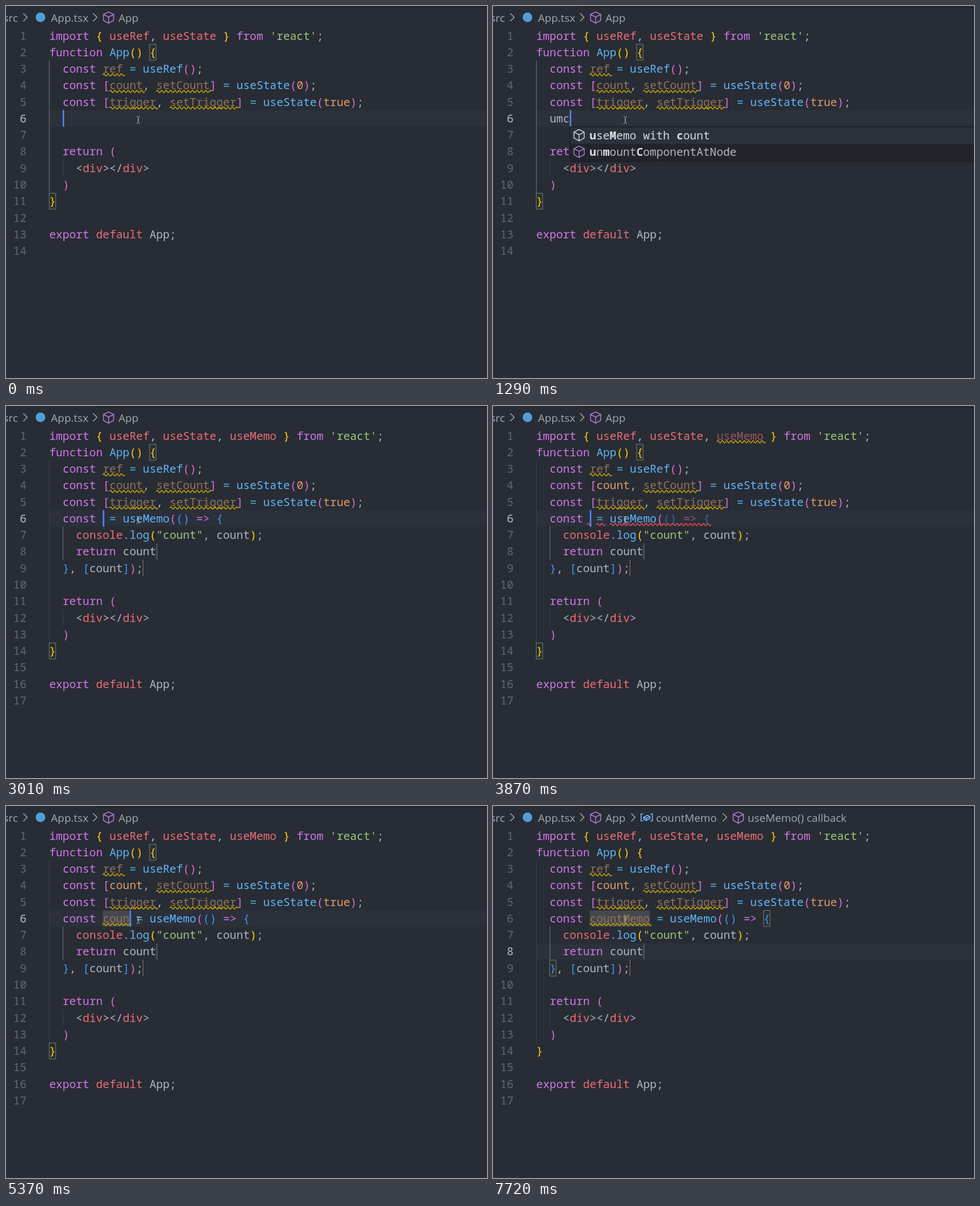
An HTML page that plays this animation: 851 by 658 pixels, repeating every 8 s.

```html
<!DOCTYPE html>
<html lang="en">
<head>
<meta charset="utf-8">
<title>Snippet completion</title>
<style>
  html, body { margin: 0; width: 100%; height: 100%; overflow: hidden; background: #282c34; }
  svg { display: block; width: 851px; height: 658px; }
  text { font: 19.71px "Noto Sans Mono", monospace; white-space: pre; font-variant-ligatures: none; }
  .crumb { font: 19px "Open Sans", sans-serif; fill: #a3a9b5; }
  .hint { font-size: 16.8px; fill: #7b818c; }
  .hit { font-weight: 700; fill: #dde0e6; }
  path { fill: none; }
</style>
</head>
<body>
<svg id="stage" viewBox="0 0 851 658"></svg>
<script>
const LOOP = 8000, CHAR = 11.83, ROW = 29.28, LEFT = 76.5, TOP = 37.9;
const stage = document.getElementById('stage');

const colors = {
  k: '#d278e8', r: '#ec6d77', w: '#b0b7c4', g: '#9bc77c', b: '#61b5f8', o: '#e09c6a',
  c: '#50b4dc', y: '#ffd10a', p: '#da70d6', n: '#3d97f5', d: '#93745a', e: '#9c575f',
  m: '#3567a0', q: '#98567f'
};
const YELLOW = '#cca700', RED = '#f14c4c', VIOLET = '#b180d7', SKY = '#75beff', PALE = '#d7dae0';
const FAINT = '#3b4048', STRONG = '#636b78';

// "~x" switches the ink to colors.x
const tail = ['~kreturn ~p(', '  ~w<~rdiv~w></~rdiv~w>', '~p)'].map(s => '  ' + s)
  .concat('~y}', '', '~kexport ~rdefault ~wApp;', '');
const head = (extra, count) => [
  `~kimport ~y{ ~ruseRef~w, ~ruseState${extra} ~y} ~kfrom ~g'react'~w;`,
  '~kfunction ~bApp~y() {',
  '  ~kconst ~dref ~c= ~buseRef~p()~w;',
  `  ~kconst ~p[~${count}count~w, ~dsetCount~p] ~c= ~buseState~p(~o0~p)~w;`,
  '  ~kconst ~p[~dtrigger~w, ~dsetTrigger~p] ~c= ~buseState~p(~otrue~p)~w;'
];

// Suggestions: icon letter, then the label with *matched* letters
const lists = {
  u: ['C*u*seState', 'C*u*seRef', 'C*u*seMemo', 'C*u*seEffect', 'C*u*seContext', 'C*u*seReducer',
      'C*u*seCallback', 'V*u*seHistory', 'V*u*seLocation', 'V*u*seParams', 'V*u*seRouteMatch', 'C*u*nescape'],
  um: ['C*u*se*M*emo', 'C*u*n*m*ountComponentAtNode', 'V*u*seRoute*M*atch|react', 'C*u*seI*m*perativeHandle',
       'V*u*sePara*m*s|react', 'V*U*int8Cla*m*pedArray', 'V*U*RLSearchPara*m*s',
       'Cdecode*U*RICo*m*ponent', 'Cencode*U*RICo*m*ponent'],
  umc: ['C*u*se*M*emo with *c*ount', 'C*u*n*m*ount*C*omponentAtNode'],
  umco: ['C*u*se*M*emo with *co*unt'],
  umcou: ['C*u*se*M*emo with *cou*nt'],
  c: ['W*c*aption', 'W*c*ircle', 'W*c*ite', 'W*c*lass', 'W*c*ode', 'W*c*ol', 'W*c*olg',
      'W*c*olgroup', 'W*c*ommand', 'W*c*onst', 'S*c*tor', 'W*c*ursor'],
  co: ['W*co*de', 'W*co*l', 'W*co*lg', 'W*co*lgroup', 'W*co*mmand', 'S*c*t*o*r']
};

// time, typed word, caret shown, options
const steps = [
  [0, '', 1], [200, '', 0], [410, 'u', 1], [630, 'um', 1], [1070, 'um', 0],
  [1290, 'umc', 1], [1510, 'umco', 1], [1720, 'umcou', 1],
  [2150, 'umcou', 0, { wrong: 1 }], [2800, 'umcou', 1, { wrong: 1 }],
  [3010, '', 1, { open: 1, fresh: 1 }], [3440, '', 0, { open: 1, broken: 1 }],
  [3870, '', 1, { open: 1, broken: 1 }], [4510, 'c', 1, { open: 1, broken: 1 }],
  [4940, 'co', 1, { open: 1, broken: 1 }], [5150, 'cou', 1, { open: 1, broken: 1 }],
  [5370, 'coun', 1, { open: 1 }], [5780, 'count', 1, { open: 1 }],
  [5990, 'countM', 1, { open: 1, clash: 1 }], [6210, 'countMe', 1, { open: 1, clash: 1 }],
  [6640, 'countMem', 1, { open: 1 }], [6850, 'countMemo', 1, { open: 1 }],
  [7290, 'countMemo', 1, { open: 1, body: 1 }], [7720, 'countMemo', 0, { open: 1, body: 1 }]
];

const colX = c => LEFT + c * CHAR;
const rowY = r => TOP + (r - 1) * ROW;
const esc = s => s.replace(/&/g, '&amp;').replace(/</g, '&lt;');
const rect = (x, y, w, h, fill, more = '') =>
  `<rect x="${x}" y="${y}" width="${w}" height="${h}" fill="${fill}" ${more}/>`;
const text = (x, y, s, attrs) => `<text x="${x}" y="${y}" ${attrs}>${esc(s)}</text>`;
const stroke = (d, color, width = 1.4, more = '') =>
  `<path d="${d}" stroke="${color}" stroke-width="${width}" ${more}/>`;

function codeLine(src, row) {
  let col = 0, ink = 'w', out = '';
  for (const part of src.split(/(~[a-z])/)) {
    if (/^~[a-z]$/.test(part)) { ink = part[1]; continue; }
    if (part.trim()) {
      const pad = part.length - part.trimStart().length;
      out += text(colX(col + pad), rowY(row) + 21.6, part.trim(), `fill="${colors[ink]}"`);
    }
    col += part.length;
  }
  return out;
}

function squiggle(row, from, to, color) {
  const end = colX(to);
  let x = colX(from), d = `M${x} ${rowY(row) + 25.4}`;
  for (let up = 1; x < end; x += 3.9, up = -up) d += `q1.95 ${-4 * up} 3.9 0`;
  return stroke(d, color, 1.5);
}

const bracketBox = (row, col) =>
  rect(colX(col), rowY(row) + .5, CHAR - .4, ROW - 1, '#28352f', 'stroke="#75806f" fill-opacity=".6"');
const guide = (col, from, to, color) =>
  rect(Math.floor(colX(col)), rowY(from), 1.3, (to - from + 1) * ROW, color);

function icon(kind, x, y, color) {
  const shapes = {
    C: c => stroke('M0-10 9-5.7V5L0 10-9 5V-5.7ZM-9-5.5 0-1 9-5.5M0-1V10', c || VIOLET, 1.5),
    V: c => stroke('M-6.5-6.5H-10V6H-6.5M6.5-6.5H10V6H6.5M-5.5-.5 1-4 5.5-2V2L-1 5-5.5 3ZM-5.5-.5-1 1.5 5.5-2M-1 1.5V5', c || SKY, 1.6),
    W: c => stroke('M-9.5 6.5-1-2C-2-7 2-11 7-9.5L3-5.5 5.5-3 9.5-7C11-2 7 2 2 1L-6.5 9.5C-8.5 11-11 8.5-9.5 6.5Z', c || '#c5c8ce', 1.5),
    S: c => stroke('M-9 7V-10H9V7', c || '#c5c8ce', 1.6) + stroke('M-10 9H10', '#c5c8ce', 2, 'stroke-dasharray="2 1.6"')
  };
  return `<g transform="translate(${x} ${y})">${shapes[kind](color)}</g>`;
}

function popup(items, x) {
  const top = rowY(7);
  let out = rect(x - .5, top - .1, 860 - x, items.length * ROW + 3, '#21252b', 'stroke="#181a1f"');
  items.forEach((item, i) => {
    const y = top + 1 + i * ROW, [label, hint] = item.slice(1).split('|');
    if (!i) out += rect(x, y, 860 - x, ROW, '#2c313a');
    out += icon(item[0], x + 15.5, y + 14, i ? '' : PALE);
    let col = 0;
    label.split('*').forEach((part, j) => {
      if (part) out += text(x + 34 + col * CHAR, y + 21, part, j % 2 ? 'class="hit"' : `fill="${i ? colors.w : PALE}"`);
      col += part.length;
    });
    if (hint) out += text(806, y + 20.5, hint, 'class="hint"');
  });
  return out;
}

function breadcrumb(deep) {
  const crumb = (x, s) => text(x, 27.6, s, 'class="crumb"');
  const arrow = x => stroke(`M${x} 13 l7 7 -7 7`, '#a3a9b5', 1.5);
  let out = rect(159, 0, 692, 3, '#21252b')
    + text(21, 27.6, 'src', 'class="crumb" text-anchor="end"') + arrow(30.5)
    + '<circle cx="61" cy="20" r="8.5" fill="#4f9fd8"/>' + crumb(79.5, 'App.tsx') + arrow(154)
    + icon('C', 181.5, 20.5) + crumb(199, 'App');
  if (deep) out += arrow(244.5) + icon('V', 272, 20.5) + crumb(288.5, 'countMemo')
    + arrow(406.5) + icon('C', 434, 20.5) + crumb(450.5, 'useMemo() callback');
  return out;
}

function draw([, word, caret, { open, fresh, broken, wrong, clash, body } = {}]) {
  const len = word.length, active = body ? 8 : 6;
  const eq = 9 + len, fn = eq + 2;
  let rows, marks = '';

  let out = rect(LEFT, rowY(active), 780, ROW, open && !body ? '#2b303b' : '#2c313a');
  if (open) {
    const fade = broken ? '~m() ~q=> ~m{' : '~n() ~k=> ~n{';
    rows = [...head(`~w, ~${broken ? 'e' : 'r'}useMemo`, fresh ? 'd' : 'o'),
      `  ~kconst ~d${word} ~c= ~buseMemo~p(${fade}`,
      '    ~rconsole~w.~blog~y(~g"count"~w, count~y)~w;',
      '    ~kreturn ~wcount', '  ~n}~w, ~n[~wcount~n]~p)~w;', '', ...tail];
    out += guide(0, 3, 13, FAINT) + guide(2, 7, 8, STRONG) + guide(2, 12, 12, FAINT);
    if (len) out += rect(colX(8), rowY(6) + .5, len * CHAR, ROW - 1, '#45484c');
    out += rect(colX(16) - .5, rowY(8) + .5, 3, ROW - 1, '#4b4f55')
      + rect(colX(14) - .3, rowY(9), 1.2, ROW, '#77736a');
    out += body ? bracketBox(6, fn + 14) + bracketBox(9, 2) : bracketBox(2, 15) + bracketBox(14, 0);

    if (broken) {
      marks += squiggle(1, 27, 34, YELLOW) + squiggle(6, eq, eq + 1, RED) + squiggle(6, fn, fn + 15, RED);
      if (!len) marks += squiggle(6, 7.6, 8.2, RED);
    }
    if (fresh) marks += squiggle(4, 9, 14, YELLOW);
    if (len) marks += squiggle(6, 8, 8 + len, YELLOW);
    if (clash) marks += squiggle(4, 9, 14, RED) + squiggle(6, 8, 7 + len, RED);
  } else {
    rows = [...head('', 'd'), '  ' + word, '', ...tail];
    out += guide(0, 3, 10, STRONG) + guide(2, 9, 9, FAINT) + bracketBox(2, 15) + bracketBox(11, 0);
    marks += squiggle(4, 9, 14, YELLOW);
    if (wrong) marks += squiggle(6, 2, 2 + len, RED);
  }

  marks += squiggle(3, 8, 11, YELLOW) + squiggle(4, 16, 24, YELLOW)
    + squiggle(5, 9, 16, YELLOW) + squiggle(5, 18, 28, YELLOW);
  rows.forEach((src, i) => {
    const row = i + 1;
    out += text(36.3, rowY(row) + 21.6, String(row),
      `text-anchor="end" fill="${row === active ? '#b9bfca' : '#5f687a'}"`);
    out += codeLine(src, row);
  });
  out += marks;

  const caretX = colX(body ? 16 : (open ? 8 : 2) + len);
  if (caret) out += rect(caretX + .2, rowY(active), 2.5, ROW, '#528bff');
  if (lists[word]) out += popup(lists[word], caretX + 1.2);
  out += stroke('M231 195.5H233M235 195.5H237M234 196.5V206.5M231 207.5H233M235 207.5H237', '#c4c8ce', 1.2);
  stage.innerHTML = out + breadcrumb(body);
}

let shown;
function tick(now) {
  const t = now % LOOP;
  const step = steps.findLast(s => s[0] <= t);
  if (step !== shown) draw(shown = step);
  requestAnimationFrame(tick);
}
draw(shown = steps[0]);
requestAnimationFrame(tick);
</script>
</body>
</html>
```
